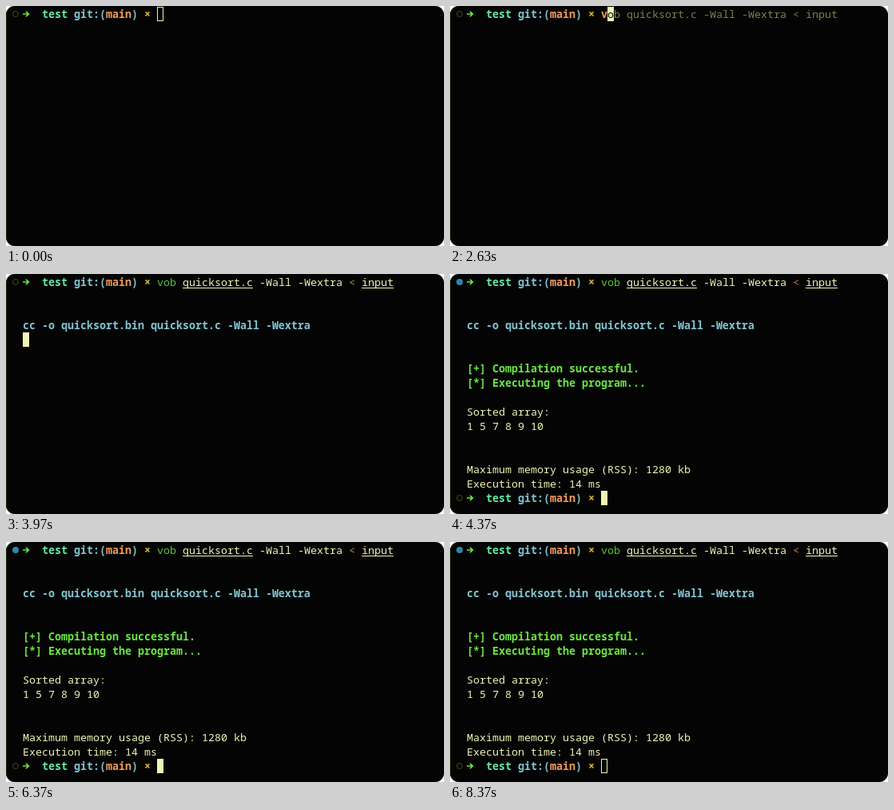
These frames come from a looping animation (548 px wide and 300 px high, 8.41 s). An HTML page:

```html
<!DOCTYPE html>
<html lang="en">
<head>
<meta charset="utf-8">
<title>Terminal session</title>
<style>
  html, body { margin: 0; width: 100%; height: 100%; overflow: hidden; background: #fff; }
  .term {
    position: relative; width: 548px; height: 300px; overflow: hidden;
    border-radius: 11px; background: #040404; color: #eff5b4;
    box-shadow: inset 1px 0 #203206;
    font: 13.333px/18px "Noto Sans Mono", "DejaVu Sans Mono", monospace;
    font-variant-ligatures: none;
    --loop: 8410ms;
  }
  .line, .cmd { position: absolute; left: 21px; top: calc(1px + var(--row, 0) * 18px); white-space: pre; }
  .cmd { left: 189px; }
  b { font-weight: 700; }
  u { text-decoration: underline 1px; text-underline-offset: 2px; text-decoration-skip-ink: none; }

  .dir { color: #66e6a4; }
  .vcs { color: #82c4d2; }
  .branch { color: #f29a5c; }
  .dirty { color: #dcbc2c; }
  .ok { color: #6ae545; }
  .run { color: #5cc43c; }
  .redir { color: #d48a34; }
  .hint { color: #74854a; }
  .under { color: #080808; }

  .arrow { position: absolute; left: 0; top: 4px; width: 10px; height: 10px; overflow: visible; }
  .arrow path { fill: none; stroke: #6ae545; stroke-width: 1.7; }

  .mark {
    position: absolute; left: 8px; top: calc(6px + var(--row, 0) * 18px);
    width: 8px; height: 8px; box-sizing: border-box; border-radius: 50%;
    border: 1.3px solid #4b4a16;
  }
  .mark.done { border: 0; background: #2e87a4; }

  .cursor {
    position: absolute; left: 21px; top: 1px; width: 8px; height: 18px;
    box-sizing: border-box; border: 1px solid #eff5b4;
    animation: cursor var(--loop) step-end infinite;
  }
  .hinted { animation: hinted var(--loop) step-end infinite; }
  .accepted { animation: accepted var(--loop) step-end infinite; }
  .started { animation: started var(--loop) step-end infinite; }
  .finished { animation: finished var(--loop) step-end infinite; }
  .pending { animation: pending var(--loop) step-end infinite; }

  /* focus, first key, accept hint, enter, program ends, blur */
  @keyframes cursor {
    0%       { transform: translate(168px, 0); background: transparent; }
    7.134%   { transform: translate(168px, 0); background: #eff5b4; }
    16.052%  { transform: translate(176px, 0); background: #eff5b4; }
    34.483%  { transform: translate(464px, 0); background: #eff5b4; }
    45.779%  { transform: translate(0, 72px); background: #eff5b4; }
    47.562%  { transform: translate(168px, 270px); background: #eff5b4; }
    95.125%, 100% { transform: translate(168px, 270px); background: transparent; }
  }
  @keyframes hinted {
    0% { visibility: hidden; }
    16.052% { visibility: visible; }
    34.483%, 100% { visibility: hidden; }
  }
  @keyframes accepted {
    0% { visibility: hidden; }
    34.483%, 100% { visibility: visible; }
  }
  @keyframes started {
    0% { visibility: hidden; }
    45.779%, 100% { visibility: visible; }
  }
  @keyframes finished {
    0% { visibility: hidden; }
    47.562%, 100% { visibility: visible; }
  }
  @keyframes pending {
    0% { visibility: visible; }
    47.562%, 100% { visibility: hidden; }
  }
</style>
</head>
<body>
<div class="term">
  <div class="cursor"></div>

  <div class="mark pending"></div>
  <div class="mark done finished"></div>
  <div class="line"><svg class="arrow"><path d="M0 5H7M4 1.8L7.3 5L4 8.2"/></svg><b>   <span class="dir">test</span> <span class="vcs">git:(</span><span class="branch">main</span><span class="vcs">)</span> <span class="dirty">×</span></b></div>

  <div class="cmd hinted"><b class="branch">v</b><span class="under">o</span><span class="hint">b quicksort.c -Wall -Wextra &lt; input</span></div>
  <div class="cmd accepted"><span class="run">vob</span> <u>quicksort.c</u> -Wall -Wextra <span class="redir">&lt;</span> <u>input</u></div>

  <div class="line started" style="--row:3"><b class="vcs">cc -o quicksort.bin quicksort.c -Wall -Wextra</b></div>

  <div class="finished">
    <div class="line" style="--row:6"><b class="ok">[+] Compilation successful.
[*] Executing the program...</b></div>
    <div class="line" style="--row:9">Sorted array:
1 5 7 8 9 10</div>
    <div class="line" style="--row:13">Maximum memory usage (RSS): 1280 kb
Execution time: 14 ms</div>
    <div class="mark" style="--row:15"></div>
    <div class="line" style="--row:15"><svg class="arrow"><path d="M0 5H7M4 1.8L7.3 5L4 8.2"/></svg><b>   <span class="dir">test</span> <span class="vcs">git:(</span><span class="branch">main</span><span class="vcs">)</span> <span class="dirty">×</span></b></div>
  </div>
</div>
</body>
</html>
```
